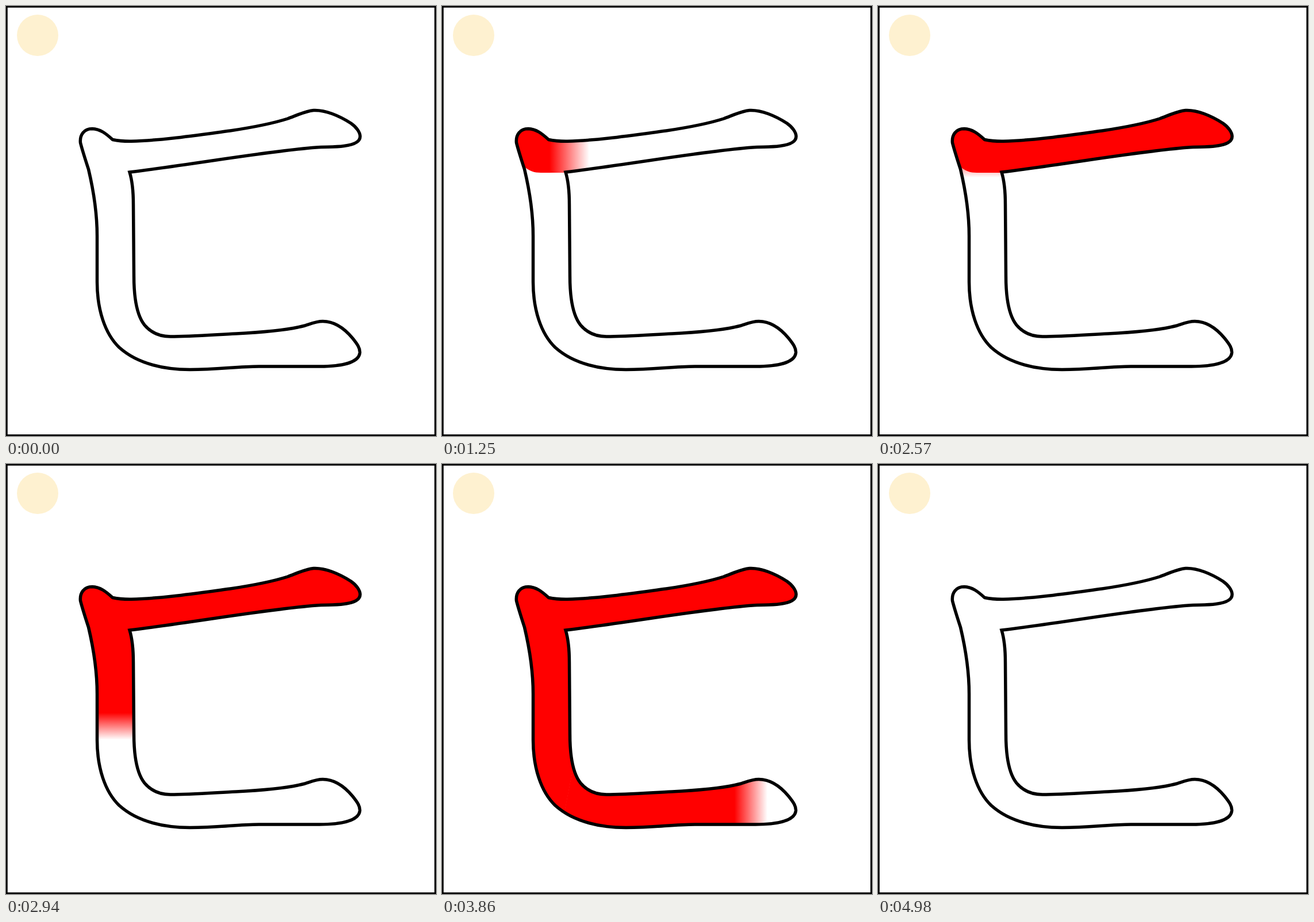
An HTML page that plays this animation: 748 px wide and 748 px high, repeating every 5.01 s.

```html
<!DOCTYPE html>
<html lang="ko">
<head>
<meta charset="utf-8">
<title>Stroke order</title>
<style>
  html, body { margin: 0; width: 100%; height: 100%; overflow: hidden; background: #fff; }
  svg { display: block; width: 100%; height: 100%; }
</style>
</head>
<body>
<svg viewBox="0 0 748 748">
  <defs>
    <path id="glyph" d="M535 181.500C555 180.500 580 191 600 204C610 211 616 220 616 227
      C616 236 607 241 588 243.500C570 246 555 244.500 540 246C450 253 330 275 215 289
      C219 302 221.500 318 221.500 345L222.500 470C222.500 510 229 540 241 555
      C252 568 267 575 286 575C320 575 360 572 400 570C450 567.500 490 564 520 556
      C532 552 540 548.500 551 548.500C570 548.500 588 560 603 578C611 588 616 595 615.500 603
      C614 620 585 627 545 627L440 627C400 627 370 632.500 320 632.500
      C265 632 225 619 197 594C172 570 158.500 528 158.500 480L158.500 400
      C158.500 360 152 320 143.500 284C138 267 133 252 129.500 238
      C128 224 136 213.500 150 213.500C164 214 174 222 185.500 232.500
      C195 234.500 205 235.500 218 235.300C270 234 330 225 390 217
      C430 211 465 204 490 196C505 190.500 520 183 535 181.500Z"/>
    <clipPath id="inside"><use href="#glyph"/></clipPath>
    <linearGradient id="top" gradientUnits="userSpaceOnUse" x1="0" y1="0" x2="1" y2="0">
      <stop offset="0" stop-color="#f00"/><stop offset="1" stop-color="#f00" stop-opacity="0"/>
    </linearGradient>
    <linearGradient id="stem" href="#top" x1="0" y1="0" x2="0" y2="1"/>
    <linearGradient id="foot" href="#top" x1="0" y1="0" x2="1" y2="0"/>
  </defs>
  <rect width="748" height="748" fill="#fff"/>
  <circle cx="55" cy="51" r="36" fill="#fef1d0"/>
  <g id="ink" clip-path="url(#inside)">
    <path fill="url(#stem)" d="M120 278H240V480L229 525L212 612H120Z"/>
    <path fill="url(#foot)" d="M228.500 525L240 500H640V650H204L211.500 612Z"/>
    <path fill="url(#top)" d="M120 170H640V290H172C160 290 152 287 142 279L120 270Z"/>
  </g>
  <use href="#glyph" fill="none" stroke="#000" stroke-width="5.500"/>
  <rect x="1.250" y="1.250" width="745.500" height="745.500" fill="none" stroke="#000" stroke-width="3"/>
</svg>
<script>
  const LOOP = 5010, STEP = LOOP / 152, CLEAR = 4545;
  const byId = id => document.getElementById(id);

  // Each wipe crosses its part from one end to the other with a soft edge.
  const wipes = [
    { id: 'top',  axis: 'x', from: 131, to: 615, start: 1025, length: 1005 },
    { id: 'stem', axis: 'y', from: 278, to: 606, start: 2530, length: 750 },
    { id: 'foot', axis: 'x', from: 213, to: 615, start: 3280, length: 750 }
  ];

  function wipe(w, t) {
    const size = w.to - w.from, soft = size / 7;
    const p = Math.min(1, Math.max(0, (t - w.start) / w.length));
    const lead = w.from + p * (size + soft) + (p === 1 ? 9 : p === 0 ? -40 : 0);
    const g = byId(w.id);
    g.setAttribute(w.axis + 1, lead - soft);
    g.setAttribute(w.axis + 2, lead);
  }

  function draw(now) {
    const t = Math.floor(((now % LOOP) + 3) / STEP) * STEP;
    byId('ink').style.display = t < wipes[0].start - STEP || t >= CLEAR ? 'none' : '';
    wipes.forEach(w => wipe(w, t));
  }

  const begin = performance.now();
  function tick() {
    draw(performance.now() - begin);
    requestAnimationFrame(tick);
  }
  tick();
</script>
</body>
</html>
```
